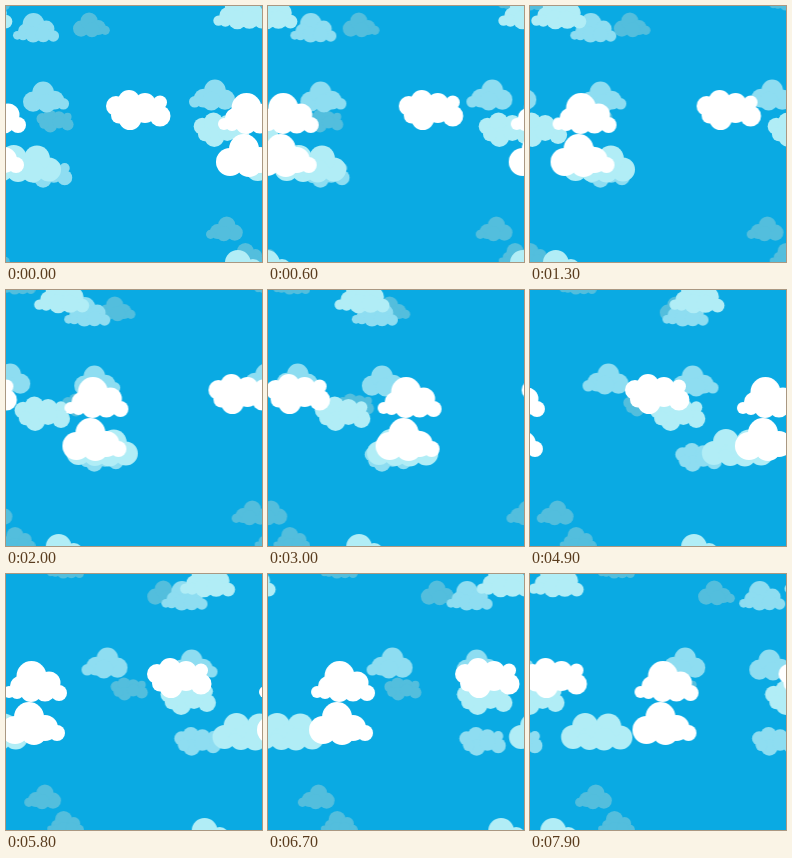
Write an HTML page that moves like this. It is 256x256 px and loops after 8 s.

```html
<!DOCTYPE html>
<html lang="en">
<head>
<meta charset="utf-8">
<title>Drifting clouds</title>
<style>
  html, body { margin: 0; width: 100%; height: 100%; overflow: hidden; background: #0aaae3; }
  svg { display: block; width: 100%; height: 100%; }
  .layer { animation: drift 8s steps(80) infinite; }
  @keyframes drift { to { transform: translateX(var(--shift)); } }
</style>
</head>
<body>
<svg id="sky" viewBox="0 0 256 256"></svg>
<script>
  const SIZE = 256, CLOUD_WIDTH = 64;

  // Each cloud is a set of circles: x, y, radius
  const shapes = {
    long: [[10, 16, 10], [23, 11, 11], [39, 14, 11], [54, 12.5, 7],
           [54, 26, 10.5], [24, 28.5, 11.5], [13, 25.5, 8], [39, 22, 11]],
    peak: [[28.5, 15, 15], [46, 22, 11.5], [6, 31, 6], [17, 25, 10],
           [14, 31, 7], [56, 32, 8], [28, 30, 11], [42, 30, 10.5]],
    puff: [[14, 28, 14], [28, 15, 15], [44, 26, 13], [56, 31, 8], [33, 30, 13]]
  };

  // Back to front; speed in pixels per second; clouds: shape, x, y, mirrored
  const layers = [
    { color: '#53bedd', scale: 0.575, speed: 12.8, clouds: [
      ['puff', 67, 6.5], ['long', 30.5, 103.5], ['puff', 200, 210.5, true], ['peak', 223, 237]] },
    { color: '#8eddf1', scale: 0.72, speed: 25.6, clouds: [
      ['peak', 7, 7], ['puff', 17, 75.5], ['puff', 183, 73.5, true], ['long', 19.8, 153]] },
    { color: '#b1edf6', scale: 0.86, speed: 38.4, clouds: [
      ['peak', 207.3, 244], ['puff', 239.7, 139], ['puff', 256, 139.5, true], ['long', 187.7, 106.5]] },
    { color: '#ffffff', scale: 1, speed: 51.2, clouds: [
      ['long', 100, 84], ['peak', 212, 87], ['puff', 210, 128]] }
  ];

  const drawCloud = (scale, [shape, x, y, mirrored]) =>
    shapes[shape].map(([cx, cy, r]) => {
      const px = x + scale * (mirrored ? CLOUD_WIDTH - cx : cx);
      return `<circle cx="${px}" cy="${y + scale * cy}" r="${scale * r}"/>`;
    }).join('');

  // Repeat the tile so clouds wrap around both edges
  const drawLayer = ({ color, scale, speed, clouds }) => {
    const tile = clouds.map(cloud => drawCloud(scale, cloud)).join('');
    let copies = '';
    for (const dx of [-2, -1, 0])
      for (const dy of [-1, 0])
        copies += `<g transform="translate(${dx * SIZE} ${dy * SIZE})">${tile}</g>`;
    return `<g class="layer" fill="${color}" style="--shift:${speed * 8}px">${copies}</g>`;
  };

  document.getElementById('sky').innerHTML = layers.map(drawLayer).join('');
</script>
</body>
</html>
```
